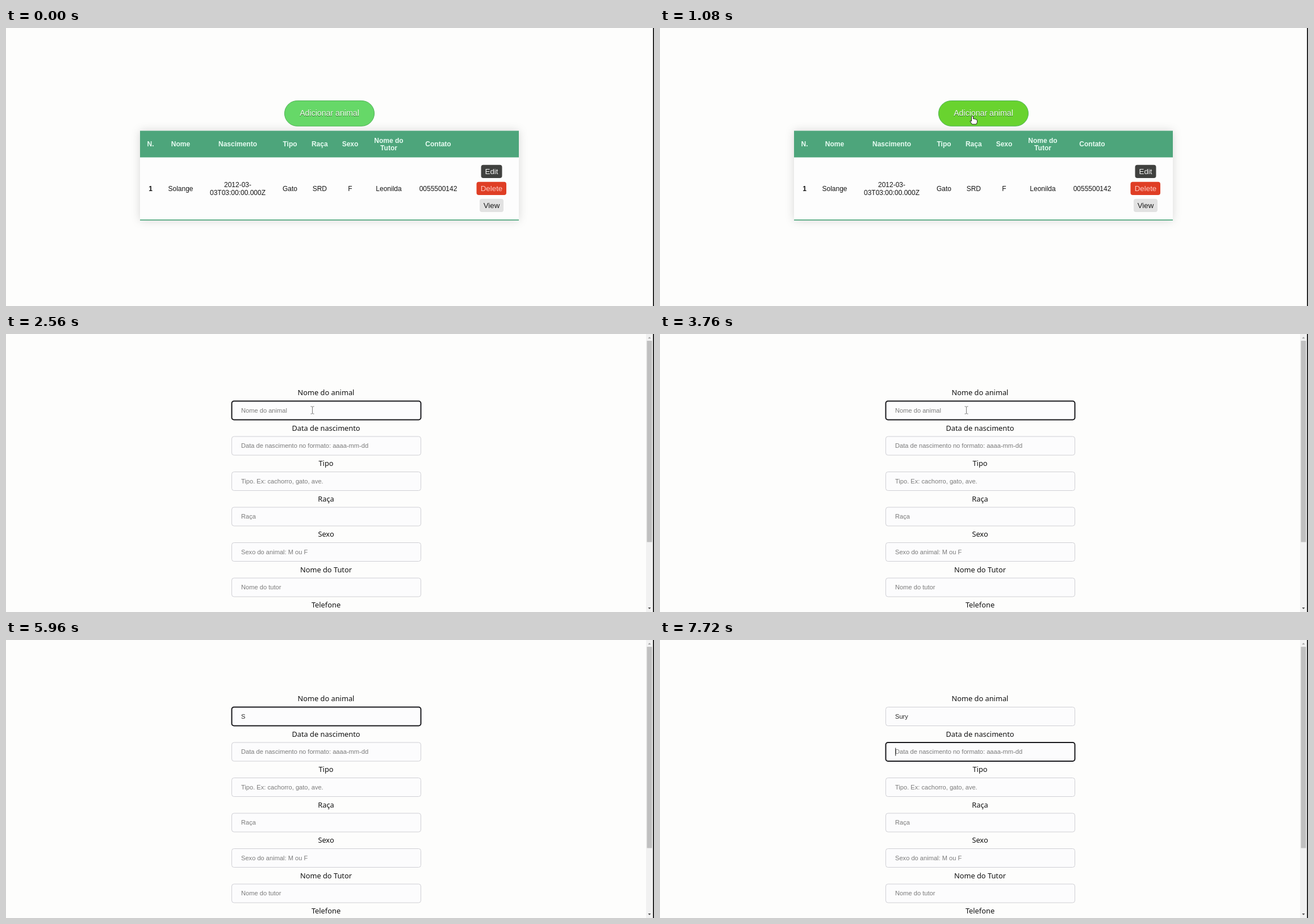
An HTML page for the animation above (8000 ms loop, 1141 by 491 pixels).

```html
<!DOCTYPE html>
<html lang="pt">
<head>
<meta charset="utf-8">
<style>
  html, body { margin: 0; width: 100%; height: 100%; overflow: hidden; background: #fdfdfc; }
  svg { display: block; width: 1141px; height: 491px; }
  text { font: 12px "Liberation Sans", Arial, sans-serif; fill: #151515; }
  .mid text, text.mid { text-anchor: middle; }
  .head text { font-weight: bold; fill: #e6fbf1; }
  .label { font: 12.8px "Noto Sans", "Open Sans", sans-serif; fill: #111; }
  .hint { font-size: 11.12px; fill: #7b7b7b; }
  .typed { fill: #2a2a2a; }
  .action { font-size: 13.34px; }
  .add { font-size: 14.17px; fill: #f4fff2; text-shadow: 0 1px 0 #2f6627; }
  .field { fill: #fcfcfd; stroke: #cfcfd4; }
  .field.focus { stroke: #19191d; stroke-width: 2; }
  .shadow { filter: drop-shadow(0 0 8px rgba(0, 0, 0, .15)); }
</style>
</head>
<body>
<svg viewBox="0 0 1141 491">
  <g id="list"></g>
  <g id="form"></g>
  <rect id="caret" width="1" height="14" fill="#111"/>
  <g id="cursor" stroke-linejoin="round">
    <path id="arrow" d="M0 0V14L3.3 11L5.6 16L7.8 15L5.6 10.2H10Z" fill="#111" stroke="#fff"/>
    <path id="hand" d="M-1.5 1Q0 -1 1.5 1V5Q3 4 4 5.5Q5.5 4.8 6.3 6.2Q8.5 6 8.5 8V11L7 14.5H-.5L-4 9.5Q-4.5 7.5 -1.5 9Z" fill="#fff" stroke="#222"/>
    <path id="beam" d="M-3 -6.5H-1L0 -5.5L1 -6.5H3M0 -5.5V5.5M-3 6.5H-1L0 5.5L1 6.5H3" fill="none" stroke="#777"/>
  </g>
  <rect x="1139.3" width="1.7" height="491" fill="#0a0a0a"/>
</svg>
<script>
const LOOP = 8000, STEP = 40, FORM_AT = 1280, FOCUS_AT = 1960, TAB_AT = 6560;
const $ = id => document.getElementById(id);
const text = (x, y, s, cls = '', fill = '') =>
  `<text x="${x}" y="${y}" class="${cls}" ${fill && `style="fill:${fill}"`}>${s}</text>`;
const rect = (x, y, w, h, fill, r = 0, extra = '') =>
  `<rect x="${x}" y="${y}" width="${w}" height="${h}" rx="${r}" fill="${fill}" ${extra}/>`;

// Table page
const columns = [
  [254.5, 'N.', '<tspan font-weight="bold">1</tspan>'],
  [307.5, 'Nome', 'Solange'],
  [408, 'Nascimento', '2012-03-|03T03:00:00.000Z'],
  [500, 'Tipo', 'Gato'],
  [552.3, 'Raça', 'SRD'],
  [606, 'Sexo', 'F'],
  [674, 'Nome do|Tutor', 'Leonilda'],
  [761, 'Contato', '0055500142'],
];
const actions = [
  ['Edit', 836.5, 37, '#40413f', '#f5f5f5'],
  ['Delete', 828.5, 52.5, '#df3e25', '#ffc9c1'],
  ['View', 834, 42, '#e2e2e2', '#1c1c1c'],
];
const cell = (x, y, s) => {
  const lines = s.split('|');
  return lines.map((line, i) => text(x, y + (i - (lines.length - 1) / 2) * 13.6, line)).join('');
};
$('list').innerHTML =
  `<g class="shadow">${rect(236, 181.5, 667, 158.5, '#fdfdfd')}</g>` +
  rect(236, 181.5, 667, 47, '#4da57b') + rect(236, 338.3, 667, 1.7, '#4da57b') +
  `<g class="mid head">${columns.map(([x, h]) => cell(x, 209.3, h)).join('')}</g>` +
  `<g class="mid">${columns.map(([x, , v]) => cell(x, 287.7, v)).join('')}</g>` +
  actions.map(([s, x, w, fill, ink], i) =>
    rect(x, 241.7 + 30 * i, w, 23.3, fill, 4) + text(855, 258 + 30 * i, s, 'mid action', ink)).join('') +
  rect(490.5, 128.5, 158, 44.7, '#66d868', 22.3, 'id="add" stroke="#4fb256"') +
  text(569.5, 155, 'Adicionar animal', 'mid add');

// Form page
const ROW = 62.5;
const fields = [
  ['Nome do animal', 'Nome do animal'],
  ['Data de nascimento', 'Data de nascimento no formato: aaaa-mm-dd'],
  ['Tipo', 'Tipo. Ex: cachorro, gato, ave.'],
  ['Raça', 'Raça'],
  ['Sexo', 'Sexo do animal: M ou F'],
  ['Nome do Tutor', 'Nome do tutor'],
  ['Telefone', ''],
];
$('form').innerHTML =
  fields.map(([label, hint], i) =>
    text(563.5, 108 + ROW * i, label, 'mid label') +
    `<rect class="field" x="397.5" y="${118.5 + ROW * i}" width="333" height="33" rx="4"/>` +
    text(414, 138.6 + ROW * i, hint, 'hint')).join('') +
  rect(1127, 0, 12.3, 491, '#f1f1f1') + rect(1128.5, 12, 9, 355.5, '#c0c0c0') +
  '<path d="M1130.5 8L1133 5L1135.5 8Z" fill="#a3a3a3"/><path d="M1130.5 483L1133 486L1135.5 483Z" fill="#505050"/>';
const boxes = document.querySelectorAll('.field');
const nameText = document.querySelector('.hint');

const typing = [[5960, 'S'], [6080, 'Su'], [6160, 'Sur'], [6360, 'Sury']];
const show = (el, on) => el.setAttribute('visibility', on ? 'visible' : 'hidden');
const ease = (t, from, to) => {
  const k = Math.min(1, Math.max(0, (t - from) / (to - from)));
  return k * k * (3 - 2 * k);
};
const mix = (a, b, k) => a + (b - a) * k;

// Blink restarts whenever focus or text changes
function caretOn(t) {
  if (t < FORM_AT) return false;
  if (t < FOCUS_AT) return true;
  if (t >= 5960 && t < 6000) return false;
  const restart = [TAB_AT - 40, 6360, 6160, 6000, 5360, FOCUS_AT].find(s => t >= s);
  return Math.floor((t - restart) / 600) % 2 === 0;
}

function draw(t) {
  const onForm = t >= FORM_AT;
  $('list').style.display = onForm ? 'none' : '';
  $('form').style.display = onForm ? '' : 'none';

  const k = ease(t, 600, 1080), m = ease(t, 1640, 2000);
  const x = mix(mix(912, 550, k), 539.5, m), y = mix(mix(330, 155.5, k), 134.5, m);
  const hover = x > 490 && x < 649 && y > 128 && y < 173;
  $('add').setAttribute('fill', hover ? '#69d32f' : '#66d868');
  $('cursor').setAttribute('transform', `translate(${x} ${y})`);
  const visible = t >= 440 && t < 5960;
  const shape = !onForm ? (hover ? 'hand' : 'arrow') : m === 0 ? 'hand' : y > 152 ? 'arrow' : 'beam';
  for (const id of ['arrow', 'hand', 'beam']) show($(id), visible && id === shape);

  const focus = t < FOCUS_AT ? -1 : t < TAB_AT ? 0 : 1;
  boxes.forEach((box, i) => box.classList.toggle('focus', i === focus));
  const typed = typing.filter(([at]) => t >= at).map(([, s]) => s).pop() || '';
  nameText.textContent = typed || fields[0][1];
  nameText.classList.toggle('typed', !!typed);

  const typedWidth = focus === 0 && typed ? nameText.getComputedTextLength() : 0;
  $('caret').setAttribute('x', focus < 0 ? 514.5 : 414.3 + typedWidth);
  $('caret').setAttribute('y', focus < 0 ? 96 : 128 + ROW * focus);
  show($('caret'), caretOn(t));
}

const start = performance.now();
function tick() {
  const t = (performance.now() - start) % LOOP;
  draw(Math.floor(t / STEP) * STEP);
  requestAnimationFrame(tick);
}
tick();
</script>
</body>
</html>
```
